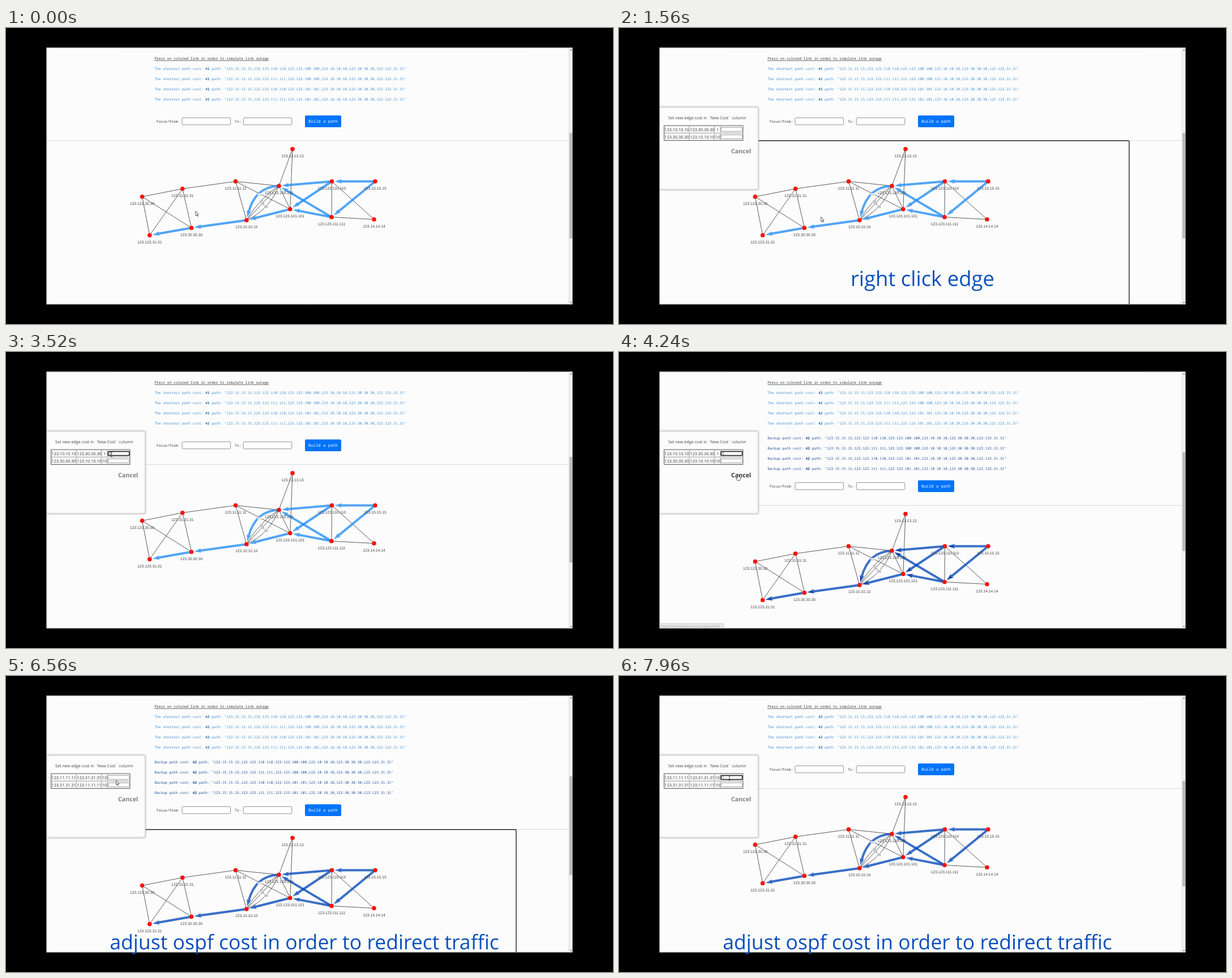
An HTML page with a canvas that plays this animation: 1072x522 px, repeating every 8 s.

```html
<!DOCTYPE html>
<html lang="en">
<head>
<meta charset="utf-8">
<title>Network path costs</title>
<style>
html, body { margin: 0; width: 100%; height: 100%; overflow: hidden; background: #000; }
canvas { display: block; }
</style>
</head>
<body>
<canvas id="stage" width="1072" height="522"></canvas>
<script>
const ctx = document.getElementById('stage').getContext('2d');
ctx.textRendering = 'geometricPrecision';
const MONO = '"Noto Sans Mono", monospace';
const SANS = '"Open Sans", sans-serif';
const ARIAL = '"Liberation Sans", sans-serif';
const LOOP = 8000;

const nodes = {
  A: [506, 213.5, '123.13.13.13'], B: [405.5, 270.5, '123.11.11.11'],
  C: [482, 278.5, '123.123.100.100'], D: [575.5, 270.5, '123.123.110.110'],
  E: [652, 270.5, '123.15.15.15'], F: [311.7, 283.5, '123.31.31.31'],
  G: [240.5, 297.5, '123.123.30.30'], H: [501.8, 319.5, '123.123.101.101'],
  I: [575, 333.5, '123.123.111.111'], J: [650, 337.5, '123.14.14.14'],
  K: [424.8, 339, '123.10.10.10'], L: [327.5, 352.5, '123.30.30.30'],
  M: [253.7, 365.5, '123.123.31.31']
};
const links = 'AC AH BF FG FM FL GM GL BC BK BH CH CK DI DJ IJ'.split(' ');
const route = 'ED EI DC DH IC IH HK CK KL LM'.split(' ');
const paths = ['DC', 'IC', 'DH', 'IH'].map(mid =>
  '"' + [...('E' + mid + 'KLM')].map(k => nodes[k][2]).join(',') + '"');

// time, x, y: the pointer eases between successive stops
const stops = [
  [0, 335, 323], [120, 335, 323], [640, 370.5, 345.5], [1440, 370.5, 345.5],
  [2160, 186, 180], [3480, 186, 180], [4000, 210, 216], [4400, 210, 216],
  [5200, 352, 349], [6040, 352, 349], [6520, 194.5, 184.5], [6680, 195, 180], [8000, 195, 180]
];

const within = (t, from, to) => t >= from && t < to;

function pointer(t) {
  const i = stops.findIndex(s => s[0] > t);
  const [t0, x0, y0] = stops[i - 1], [t1, x1, y1] = stops[i];
  const p = (t - t0) / (t1 - t0), e = p * p * (3 - 2 * p);
  return [x0 + (x1 - x0) * e, y0 + (y1 - y0) * e];
}

function text(str, x, y, font, color, align = 'left') {
  ctx.font = font;
  ctx.fillStyle = color;
  ctx.textAlign = align;
  ctx.fillText(str, x, y);
}

function box(x, y, w, h, r, fill, stroke, width = 1) {
  ctx.beginPath();
  ctx.roundRect(x, y, w, h, r);
  if (fill) { ctx.fillStyle = fill; ctx.fill(); }
  if (stroke) { ctx.strokeStyle = stroke; ctx.lineWidth = width; ctx.stroke(); }
}

function polygon(points) {
  ctx.beginPath();
  points.forEach(([x, y]) => ctx.lineTo(x, y));
  ctx.closePath();
}

function line(x0, y0, x1, y1, color, width, ctl) {
  ctx.beginPath();
  ctx.moveTo(x0, y0);
  if (ctl) ctx.quadraticCurveTo(...ctl, x1, y1);
  else ctx.lineTo(x1, y1);
  ctx.strokeStyle = color;
  ctx.lineWidth = width;
  ctx.stroke();
}

function pathLine(label, cost, path, y, color, boldColor) {
  const step = 3.74, font = '6.23px ' + MONO;
  text(label, 262.3, y, font, color);
  text(cost, 262.3 + label.length * step, y, 'bold ' + font, boldColor);
  text('path: ' + path, 262.3 + (label.length + 3) * step, y, font, color);
}

function arrow(a, b, color, headColor, ctl) {
  const from = ctl || a;
  const len = Math.hypot(b[0] - from[0], b[1] - from[1]);
  const u = (b[0] - from[0]) / len, v = (b[1] - from[1]) / len;
  const at = (back, side) => [b[0] - u * back - v * side, b[1] - v * back + u * side];
  line(a[0], a[1], ...at(14, 0), color, 4, ctl);
  polygon([at(5, 0), at(18, 4), at(14, 0), at(18, -4)]);
  ctx.fillStyle = headColor;
  ctx.fill();
}

function graph(s) {
  for (const [p, q] of links) {
    const a = nodes[p], b = nodes[q];
    const hot = s.hoverTop && p + q === 'BF';
    line(a[0], a[1], b[0], b[1], hot ? '#000' : '#333', hot ? 1.5 : 0.8);
  }
  const { C, K } = nodes;
  for (const ctl of [[447.5, 300], [464.5, 321]]) line(C[0], C[1], K[0], K[1], '#333', 0.8, ctl);

  for (const [p, q] of route) {
    const hot = s.hoverLow && p + q === 'KL';
    const color = s.dark ? 'rgba(0,70,184,.77)' : hot ? '#3292ee' : 'rgba(32,140,244,.77)';
    arrow(nodes[p], nodes[q], color, s.freshHeads ? '#0b46ae' : color, p + q === 'CK' && [440, 280]);
  }

  ctx.strokeStyle = '#fcfcfc';
  ctx.lineWidth = 1.6;
  for (const [str, x, y, color] of [['10', 448, 296, '#aaa'], ['10', 451, 308, '#444'],
    ['15', 452.7, 312, '#444'], ['15', 459, 317.2, '#444']]) {
    ctx.font = '6px ' + ARIAL;
    ctx.textAlign = 'center';
    ctx.strokeText(str, x, y);
    text(str, x, y, ctx.font, color, 'center');
  }
  for (const [x, y, name] of Object.values(nodes)) {
    ctx.beginPath();
    ctx.arc(x, y, 3.8, 0, 7);
    ctx.fillStyle = '#f8120c';
    ctx.fill();
    text(name, x, y + 14, '6.75px ' + ARIAL, '#444', 'center');
  }
}

function form() {
  const font = '6.23px ' + MONO;
  text('Focus/From:', 266, 166.6, font, '#333');
  box(311, 158.3, 85.5, 12.5, 1.5, '#fff', '#858585', 0.9);
  text('To:', 404, 166.6, font, '#333');
  box(419.3, 158.3, 85.5, 12.5, 1.5, '#fff', '#858585', 0.9);
  box(528, 154.3, 64, 20.7, 2, '#0073fb');
  text('Build a path', 560, 167.3, '7.2px ' + MONO, '#fff', 'center');
}

function panel(s) {
  ctx.save();
  ctx.shadowColor = 'rgba(0,0,0,.3)';
  ctx.shadowBlur = 3;
  box(70, 139.5, 176, 145.5, 2, '#fcfcfc', '#ccc', 0.8);
  ctx.restore();
  const font = '7.22px ' + SANS;
  text('Set new edge cost in `New Cost` column', 87, 161, font, '#444');
  box(79.5, 172, 139.5, 26.5, 0, '#fcfcfc', '#555', 0.9);
  s.rows.forEach(([from, to, cost], i) => {
    const y = 172.8 + i * 13;
    for (const [x, w] of [[80.3, 43.5], [124.7, 43.5], [169.2, 9.5], [179.6, 38.7]])
      box(x, y, w, 12, 0, null, '#999', 0.6);
    text(from, 102, y + 8.7, font, '#333', 'center');
    text(to, 147, y + 8.7, font, '#333', 'center');
    text(cost, 174, y + 8.7, font, '#333', 'center');
    const focus = i === 0 && s.focus;
    box(180.3, y + 2.6, 37.4, 7, 1, '#fff', focus ? '#111' : '#888', focus ? 1.5 : 0.8);
  });
  text(s.value, 181.8, 181.3, '6.8px ' + SANS, '#333');
  text('Cancel', 198, 220.6, 'bold 10.7px ' + SANS, s.onCancel ? '#333' : '#808080');
}

function cursor(x, y, kind) {
  ctx.save();
  ctx.translate(x, y);
  if (kind === 'beam') {
    line(0, -3.5, 0, 3.5, '#333', 0.9);
    line(-1.8, -3.8, 1.8, -3.8, '#333', 0.8);
    line(-1.8, 3.8, 1.8, 3.8, '#333', 0.8);
  } else {
    polygon(kind === 'hand'
      ? [[-0.8, 0], [0.8, 0], [0.8, 3.5], [4.8, 4.5], [4.8, 8], [3.5, 10.5], [-1, 10.5], [-3.3, 6.5], [-2.5, 5.7], [-0.8, 7]]
      : [[0, 0], [0, 8], [1.7, 6.3], [2.9, 9.2], [4.2, 8.6], [3, 5.9], [5.3, 5.9]]);
    ctx.fillStyle = '#fff';
    ctx.fill();
    ctx.strokeStyle = '#333';
    ctx.lineWidth = 0.8;
    ctx.stroke();
  }
  ctx.restore();
}

function stateAt(t) {
  const late = t >= 5000;
  const pair = late ? ['B', 'F'] : ['K', 'L'];
  const [p, q] = pair.map(k => nodes[k][2]);
  return {
    cost: t < 3600 ? '41' : '42',
    dark: t >= 3600,
    backup: within(t, 3600, 7400),
    freshHeads: within(t, 3600, 4440),
    hoverLow: within(t, 560, 1480),
    hoverTop: within(t, 5160, 6080),
    outline: within(t, 1000, 2600) || within(t, 5480, 6960),
    panel: within(t, 1280, 4360) || t >= 5960,
    focus: within(t, 2600, 4360) || t >= 6960,
    value: within(t, 3000, 4360) ? '2' : t >= 7240 ? '1' : '',
    rows: [[p, q, late ? '10' : '1'], [q, p, '10']],
    onCancel: within(t, 3920, 4440),
    kind: within(t, 2120, 3600) || t >= 6640 ? 'beam' : within(t, 3920, 4440) ? 'hand' : 'arrow'
  };
}

function draw(t) {
  const s = stateAt(t), shift = s.backup ? 72 : 0;
  ctx.fillStyle = '#000';
  ctx.fillRect(0, 0, 1072, 522);
  box(71.5, 34.8, 928.8, 452.4, 0, '#fcfcfc', '#8a8a8a', 1);

  ctx.save();
  ctx.beginPath();
  ctx.rect(72, 35, 928, 452);
  ctx.clip();
  const title = 'Press on colored link in order to simulate link outage';
  text(title, 262.3, 56.3, '6.23px ' + MONO, '#333');
  line(262.3, 57.6, 464.3, 57.6, '#333', 0.7);
  paths.forEach((path, i) => {
    pathLine('The shortest path cost: ', s.cost, path, 74.2 + i * 18, '#3f8fd6', '#2468ae');
    if (s.backup) pathLine('Backup path cost: ', s.cost, path, 153.7 + i * 18, '#1c4f9c', '#0c3c86');
  });

  ctx.save();
  ctx.translate(0, shift);
  form();
  line(72, 198.5, 994, 198.5, '#d8d8d8', 1);
  if (s.outline) box(60, 198.8, 841, 400, 2, null, '#222', 1.4);
  graph(s);
  ctx.restore();

  // scrollbar
  ctx.fillStyle = '#f0f0f0';
  ctx.fillRect(994, 35, 6, 452);
  line(993.8, 35, 993.8, 487, '#ddd', 0.7);
  ctx.fillStyle = '#bcbcbc';
  if (s.backup) ctx.fillRect(995, 177, 5, 174);
  else ctx.fillRect(995, 185, 5, 186);
  ctx.fillStyle = '#555';
  polygon([[996, 39.5], [999.5, 39.5], [997.7, 37.5]]);
  ctx.fill();
  polygon([[996, 483.5], [999.5, 483.5], [997.7, 485.5]]);
  ctx.fill();

  if (s.panel) panel(s);
  if (s.onCancel) {
    box(70, 478.5, 115.5, 10, 1.5, '#e6e6e6', '#d4d4d4', 0.7);
    text('https://meshplanora.test/upload-file', 73, 485.6, '6.2px ' + SANS, '#aaa');
  }
  ctx.restore();

  if (within(t, 400, 2800)) text('right click edge', 536, 455, '36.5px ' + SANS, '#0a4fbb', 'center');
  if (t >= 4760)
    text('adjust ospf cost in order to redirect traffic', 527, 482, '35.6px ' + SANS, '#0a4fbb', 'center');
  cursor(...pointer(t), s.kind);
}

function tick(now) {
  draw(Math.floor(now % LOOP / 40) * 40);
  requestAnimationFrame(tick);
}
requestAnimationFrame(tick);
</script>
</body>
</html>
```
